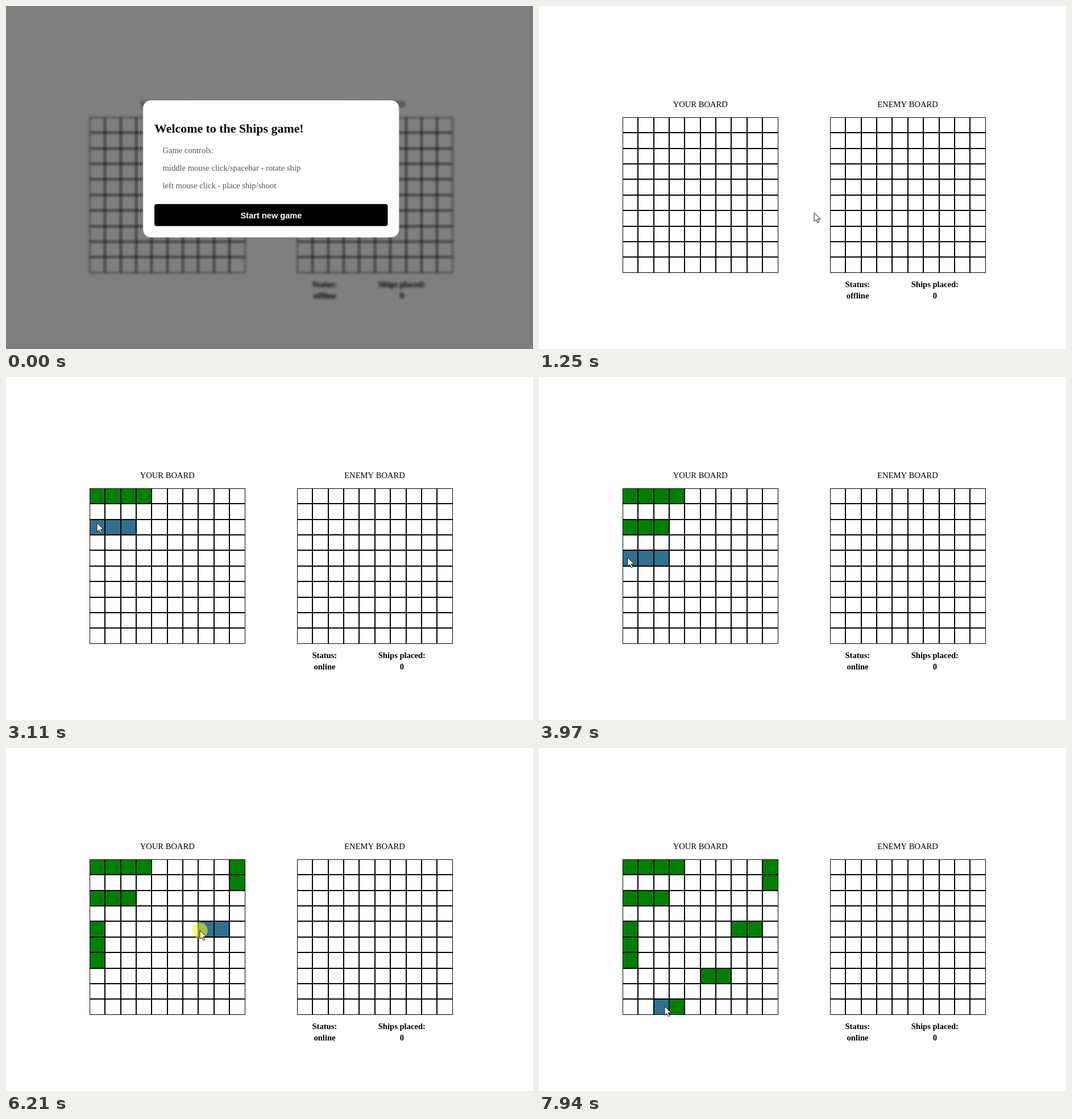
An HTML page with a canvas for the animation above (8000 ms loop, 927x604 px).

```html
<!DOCTYPE html>
<html lang="en">
<head>
<meta charset="utf-8">
<title>Ships game</title>
<style>
  html, body { margin: 0; width: 100%; height: 100%; overflow: hidden; background: #fff; }
  canvas { display: block; }
</style>
</head>
<body>
<canvas id="stage" width="927" height="604"></canvas>
<script>
const W = 927, H = 604, LOOP = 8000;
const CELL = 27.37, TOP = 195.47, LEFT = 146.35, RIGHT = 511.47;
const ENTER = 530, START = 1160, CLOSE = 1250, ONLINE = 1420;
const STEP = 70, PRESS = 80;
const SERIF = '"Liberation Serif", "Times New Roman", serif';
const SANS = '"Liberation Sans", Arial, sans-serif';
const BODY = '14.6px ' + SERIF, BOLD = 'bold ' + BODY;
const ctx = document.getElementById('stage').getContext('2d');

// Pointer glides: leave, arrive, destination
const glides = [
  [460, 960, 484, 364],
  [1350, 1880, 184, 204],
  [1880, 2220, 160, 205],
  [2690, 2960, 160, 257],
  [3450, 3780, 156, 318],
  [4260, 4660, 383, 292],
  [4660, 4730, 387, 266],
  [4730, 5200, 408, 211],
  [5260, 5750, 341, 321],
  [6220, 6680, 297, 396],
  [6890, 7160, 240, 453],
  [7620, 7940, 221, 455]
];
const clicks = [2680, 3440, 4250, 5250, 6210, 6880, 7550];
const turns = [3980, 5880];

// One ship of four cells, two of three, three of two, four of one
const fleet = [4, 3, 2, 1].flatMap(n => Array(5 - n).fill(n));
const ships = clicks.map((at, i) => ({ at: at + PRESS, box: shipBox(at, fleet[i], at) }));

function pointerAt(t) {
  let x = 712, y = 583;
  for (const [leave, arrive, toX, toY] of glides) {
    if (t < leave) break;
    const u = t >= arrive ? 1 : Math.floor((t - leave) / STEP) * STEP / (arrive - leave);
    const eased = 1 - (1 - u) ** 2;
    x += (toX - x) * eased;
    y += (toY - y) * eased;
  }
  return [x, y];
}

// Cells a ship covers when held at time t, or null off the board
function shipBox(t, len, now) {
  const [x, y] = pointerAt(t);
  const col = Math.floor((x - LEFT) / CELL), row = Math.floor((y - TOP) / CELL);
  if (Math.min(col, row) < 0 || Math.max(col, row) > 9) return null;
  const upright = turns.filter(at => now >= at).length % 2;
  return upright ? [col, row, 1, Math.min(len, 10 - row)] : [col, row, Math.min(len, 10 - col), 1];
}

function fillCells(c, [col, row, cols, rows], color) {
  const x = Math.floor(LEFT + col * CELL) + 1, y = Math.floor(TOP + row * CELL) + 1;
  c.fillStyle = color;
  c.fillRect(x, y, Math.floor(LEFT + (col + cols) * CELL) - x + 1,
    Math.floor(TOP + (row + rows) * CELL) - y + 1);
}

function grid(c, left) {
  const x0 = Math.ceil(left), y0 = Math.ceil(TOP), size = 274;
  c.fillStyle = '#000';
  for (let i = 0; i <= 10; i++) {
    const w = i % 10 ? 2 : 1;
    c.fillRect(i ? Math.floor(left + i * CELL) : x0, y0, w, size);
    c.fillRect(x0, i ? Math.floor(TOP + i * CELL) : y0, size, w);
  }
}

function text(c, str, x, y, font, color = '#000', align = 'center') {
  c.font = font;
  c.fillStyle = color;
  c.textAlign = align;
  c.fillText(str, x, y);
}

function page(c, t) {
  const online = t >= ONLINE;
  const placed = ships.filter(s => t >= s.at);
  c.fillStyle = '#fff';
  c.fillRect(0, 0, W, H);
  if (online && !placed.length) {
    c.fillStyle = '#2d79a7';
    c.fillRect(0, 5, W, 54);
    text(c, 'Place 10 ships on your board.', 466.3, 37, BOLD);
  }
  text(c, 'YOUR BOARD', 283.7, 178, BODY);
  text(c, 'ENEMY BOARD', 648.5, 178, BODY);

  // The preview trails the pointer by one step
  const held = online && shipBox(t - STEP, fleet[placed.length], t);
  if (held) fillCells(c, held, '#31708f');
  for (const s of placed) fillCells(c, s.box, '#008000');
  grid(c, LEFT);
  grid(c, RIGHT);

  text(c, 'Status:', 560.3, 495, BOLD);
  text(c, online ? 'online' : 'offline', 560.5, 515, BOLD);
  text(c, 'Ships placed:', 696.3, 495, BOLD);
  text(c, '0', 696.5, 515, BOLD);
}

function panel(c, x, y, w, h, r, color) {
  c.fillStyle = color;
  c.beginPath();
  c.roundRect(x, y, w, h, r);
  c.fill();
}

function makeWelcome() {
  const sheet = document.createElement('canvas'), back = document.createElement('canvas');
  sheet.width = back.width = W;
  sheet.height = back.height = H;
  page(back.getContext('2d'), 0);
  const c = sheet.getContext('2d');
  c.fillStyle = '#fff';
  c.fillRect(0, 0, W, H);
  c.filter = 'blur(2px)';
  c.drawImage(back, 0, 0);
  c.filter = 'none';
  c.fillStyle = 'rgba(0,0,0,.5)';
  c.fillRect(0, 0, W, H);
  panel(c, 241, 166, 450.5, 241.5, 14, '#e2e2e2');
  panel(c, 241.7, 166.7, 449, 240, 13.3, '#fff');
  text(c, 'Welcome to the Ships game!', 261, 223, 'bold 21.9px ' + SERIF, '#000', 'left');
  ['Game controls:', 'middle mouse click/spacebar - rotate ship', 'left mouse click - place ship/shoot']
    .forEach((line, i) => text(c, line, 275.5, 259 + 31 * i, BODY, '#555', 'left'));
  panel(c, 261, 348.8, 410.5, 38.8, 4, '#000');
  text(c, 'Start new game', 466.5, 373.5, 'bold 14.6px ' + SANS, '#fff');
  return sheet;
}

const arrow = new Path2D('M0 0V15.6L3.7 12.1L6.2 17.8L8.7 16.7L6.2 11.2H11.2Z');
const hand = new Path2D('M-1.5 1.5Q0 -.8 1.5 1.5V7L8 8.2Q9.5 8.6 9.5 10V13L7.5 18.5H-1' +
  'L-5.2 12.5Q-5.6 10-3.5 10.6L-1.5 12Z');

function pointer(c, t) {
  if (t < ENTER) return;
  const pressed = [START, ...clicks].some(at => t >= at && t < at + PRESS);
  const shape = t >= 960 && t < CLOSE ? hand : arrow;
  c.save();
  c.translate(...pointerAt(t));
  if (pressed) {
    c.fillStyle = 'rgba(250,250,20,.57)';
    c.beginPath();
    c.arc(0, 0, 13.8, 0, 7);
    c.fill();
  }
  c.fillStyle = pressed ? '#ffffa8' : '#fff';
  c.strokeStyle = '#101018';
  c.fill(shape);
  c.stroke(shape);
  c.restore();
}

const welcome = makeWelcome(), begin = performance.now();

function frame() {
  const t = (performance.now() - begin) % LOOP;
  if (t < CLOSE) ctx.drawImage(welcome, 0, 0);
  else page(ctx, t);
  pointer(ctx, t);
  requestAnimationFrame(frame);
}
frame();
</script>
</body>
</html>
```
